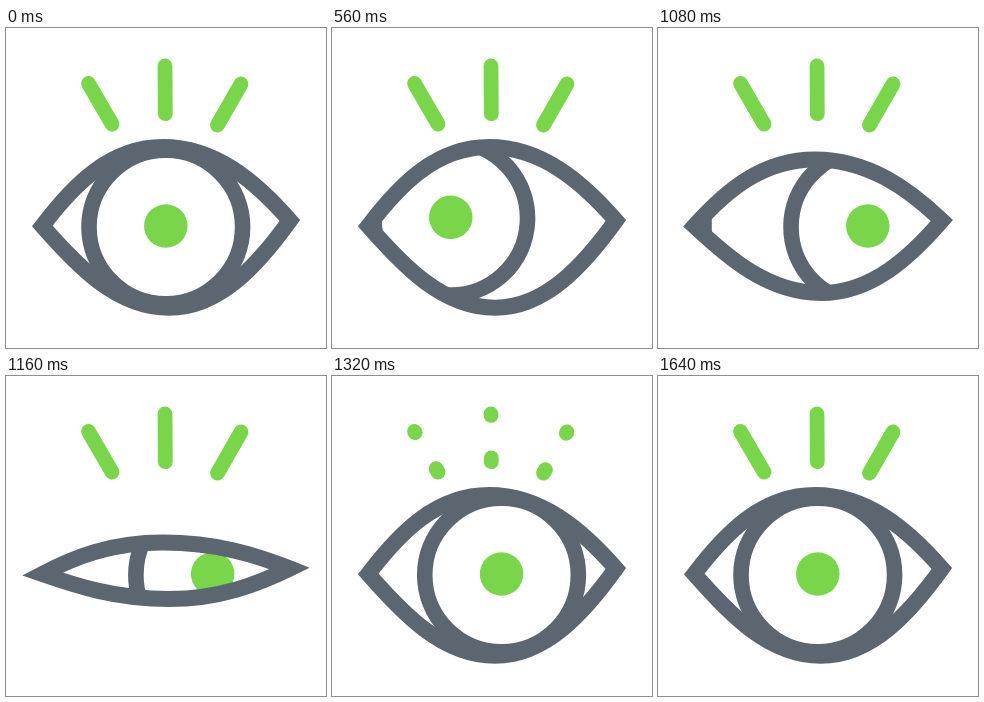
An HTML page for the animation above (2000 ms loop, 320 px wide and 320 px high).

```html
<!DOCTYPE html>
<html lang="en">
<head>
<meta charset="utf-8">
<title>Looking eye</title>
<style>
  html, body { margin: 0; width: 100%; height: 100%; overflow: hidden; background: #fff; }
  svg { display: block; width: 100%; height: 100%; }
</style>
</head>
<body>
<svg viewBox="0 0 320 320">
  <defs><clipPath id="opening"><path class="eye"/></clipPath></defs>
  <path class="eye" fill="#5c6670"/>
  <g clip-path="url(#opening)">
    <g id="iris">
      <rect x="-156" y="-200" width="318.5" height="400" fill="#fff"/>
      <circle cy="1" r="76.8" fill="none" stroke="#5c6670" stroke-width="15.6"/>
      <circle r="21.75" fill="#79d64b"/>
    </g>
  </g>
  <path class="eye" fill="none" stroke="#5c6670" stroke-width="16" stroke-miterlimit="10"/>
  <path id="lashes" fill="none" stroke="#79d64b" stroke-width="14.8" stroke-linecap="round"/>
</svg>
<script>
const LOOP = 2000, STEP = 40;
const CENTER = [159.8, 198, 0], LEFT = [99.8, 187.5, 3.5], RIGHT = [209.8, 198, 0]; // x, y, tilt
const LASHES = [[82.5, 55.5, 106, 96], [159, 38, 159.3, 85.7], [235, 56, 211.5, 97]];

const eyes = document.querySelectorAll('.eye');
const iris = document.getElementById('iris');
const lashes = document.getElementById('lashes');

const mix = (a, b, p) => a + (b - a) * p;
const progress = (t, start, end) => Math.min(1, Math.max(0, (t - start) / (end - start)));
const smooth = p => p * p * (3 - 2 * p);

// Cubic timing curve with handles (x1, 0) and (x2, 1)
function ease(p, x1, x2) {
  let lo = 0, hi = 1;
  for (let i = 0; i < 24; i++) {
    const s = (lo + hi) / 2, r = 1 - s;
    if (3 * r * r * s * x1 + 3 * r * s * s * x2 + s * s * s < p) lo = s; else hi = s;
  }
  return smooth((lo + hi) / 2);
}

function gaze(t) {
  const blend = (a, b, p) => a.map((v, i) => mix(v, b[i], p));
  if (t < 360) return blend(CENTER, LEFT, ease(progress(t, 0, 200), .33, .3));
  if (t < 1080) return blend(LEFT, RIGHT, ease(progress(t, 360, 720), 1, .7));
  return blend(RIGHT, CENTER, ease(progress(t, 1080, 1620), .44, 0));
}

function eyePath(squint) {
  const top = mix(119.1, 166.5, squint), bottom = mix(279.7, 223, squint);
  const l = 198, r = 192.5;
  return `M36.3 ${l}C67.5 ${mix(l, top, .52)} 104 ${top} 157 ${top}` +
    `C210 ${top} 250.5 ${mix(r, top, .52)} 283.9 ${r}` +
    `C252.5 ${mix(r, bottom, .5)} 214 ${bottom} 163 ${bottom}` +
    `C110 ${bottom} 70 ${mix(l, bottom, .47)} 36.3 ${l}Z`;
}

function lashPath(gap) {
  return LASHES.map(([x1, y1, x2, y2]) => {
    const at = p => `${mix(x1, x2, p)} ${mix(y1, y2, p)}`;
    if (!gap) return `M${at(0)}L${at(1)}`;
    return `M${at(0)}L${at(mix(.5, .03, gap))}M${at(mix(.5, .92, gap))}L${at(1)}`;
  }).join('');
}

function draw(t) {
  const [x, y, tilt] = gaze(t);
  const squint = smooth(progress(t, 1040, 1160)) - smooth(progress(t, 1160, 1280));
  const gap = smooth(progress(t, 1160, 1320)) - smooth(progress(t, 1320, 1640));
  const d = eyePath(squint);
  eyes.forEach(el => el.setAttribute('d', d));
  iris.setAttribute('transform', `translate(${x} ${y}) rotate(${tilt})`);
  lashes.setAttribute('d', lashPath(gap));
}

const began = performance.now();
function tick() {
  const t = (performance.now() - began) % LOOP;
  draw(Math.floor(t / STEP) * STEP);
  requestAnimationFrame(tick);
}
tick();
</script>
</body>
</html>
```
